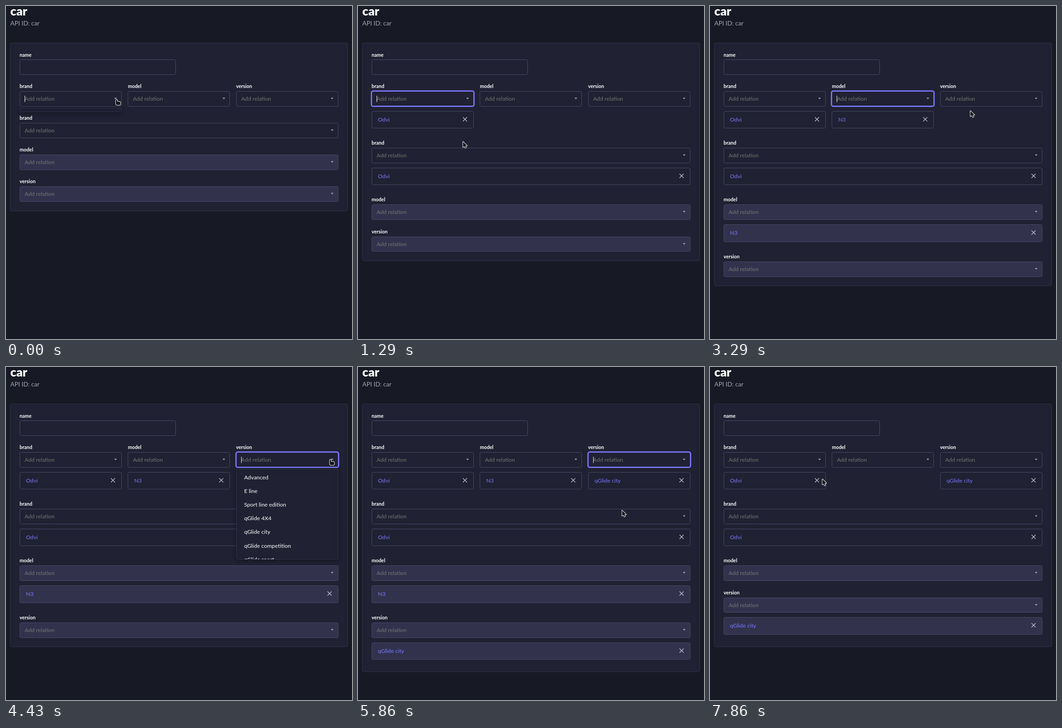
Animation of 762x735 px, one loop 8 s. Source, as an HTML page with a canvas:

```html
<!DOCTYPE html>
<html lang="en">
<head>
<meta charset="utf-8">
<title>Dependent relation fields</title>
<style>
html, body { margin: 0; width: 762px; height: 735px; overflow: hidden; background: #171924; }
canvas { display: block; }
</style>
</head>
<body>
<canvas id="stage" width="762" height="735"></canvas>
<script>
const ctx = document.getElementById('stage').getContext('2d');
const LOOP = 8000, TICK = 1000 / 7;
const BG = '#171924', CARD = '#202132', LINE = '#32324d', EDGE = '#4a4a6a', ACCENT = '#7b79ff';

const LEFT = 30, COLUMN_STEP = 238.4, COLUMN_W = 224.4, WIDE_W = 701.4;
const FIELD_Y = 188.2, FIELD_H = 32.8, FIELD_STEP = 70.2;
const CHIP_OFFSET = 43.8, CHIP_H = 37.4, CHIP_SPACE = 55.2;
const LIST_Y = 225, LIST_MAX = 199, OPTION_H = 30.1;

// each relation: the ticks at which its list opens and its choice is made
const RELATIONS = [
  { label: 'brand', open: 1, pick: 8, choice: 'Odvi', options: ['Odvi', 'KQM'] },
  { label: 'model', open: 15, pick: 23, choice: 'N3', options: ['N1', 'N3', 'W5', 'W6'] },
  { label: 'version', open: 31, pick: 39, choice: 'qGlide city',
    options: ['Advanced', 'E line', 'Sport line edition', 'qGlide 4X4', 'qGlide city',
      'qGlide competition', 'qGlide sport', 'qGlide sport'] }
];
RELATIONS.forEach((r, i) => { r.x = LEFT + i * COLUMN_STEP; });
const MODEL_REMOVED = 51;

// pointer stops: tick, x, y
const STOPS = [
  [0, 243, 206], [7, 133, 251], [11, 510, 436], [14, 487, 199], [21, 330, 275], [23, 573, 231],
  [30, 714, 204], [37, 595, 336], [39, 584, 318], [48, 517, 271], [50, 472, 248], [55, 247, 247]
];

// rests one tick at every stop, then eases to the next
function pointerAt(k) {
  const i = Math.max(1, STOPS.findIndex(s => s[0] >= k));
  const [t0, x0, y0] = STOPS[i - 1], [t1, x1, y1] = STOPS[i];
  const u = Math.max(0, (k - t0 - 1) / (t1 - t0 - 1)), e = u * u * (3 - 2 * u);
  return [x0 + (x1 - x0) * e, y0 + (y1 - y0) * e];
}

function text(str, x, y, color = '#fff', size = 12.3, weight = 400) {
  ctx.font = `${weight} ${size}px Lato, sans-serif`;
  ctx.fillStyle = color;
  ctx.fillText(str, x, y);
}

// one-pixel outline snapped to whole pixels
function box(x, y, w, h, fill, stroke) {
  const left = Math.round(x), top = Math.floor(y);
  ctx.beginPath();
  ctx.roundRect(left + 0.5, top + 0.5, Math.floor(x + w) - left, Math.floor(y + h) - top, 3);
  ctx.fillStyle = fill;
  ctx.fill();
  ctx.strokeStyle = stroke;
  ctx.lineWidth = 1;
  ctx.stroke();
}

function field(label, x, y, w, fill) {
  const top = Math.floor(y), arrowX = x + w - 13;
  text(label, x, top - 7, '#fff', 10.8, 700);
  box(x, y, w, FIELD_H, fill, EDGE);
  text('Add relation', x + 11, top + 20.5, '#757575');
  ctx.beginPath();
  ctx.moveTo(arrowX - 3, top + 14.5);
  ctx.lineTo(arrowX + 3, top + 14.5);
  ctx.lineTo(arrowX, top + 17.7);
  ctx.fillStyle = '#a5a5ba';
  ctx.fill();
}

function chip(label, x, y, w, fill) {
  const top = Math.floor(y), cx = x + w - 18.8, cy = top + 18;
  box(x, y, w, CHIP_H, fill, EDGE);
  text(label, x + 14, top + 23, ACCENT);
  ctx.beginPath();
  for (const s of [-1, 1]) {
    ctx.moveTo(cx - 4.5, cy - 4.5 * s);
    ctx.lineTo(cx + 4.5, cy + 4.5 * s);
  }
  ctx.strokeStyle = '#c0c0cf';
  ctx.lineWidth = 1.4;
  ctx.stroke();
}

function focusRing(x) {
  ctx.beginPath();
  ctx.roundRect(Math.round(x) - 0.4, 187.6, COLUMN_W + 1.4, 33.8, 4);
  ctx.strokeStyle = ACCENT;
  ctx.lineWidth = 2.7;
  ctx.stroke();
}

function list(x, items, scroll, [mx, my]) {
  const full = items.length * OPTION_H + 8, h = Math.min(LIST_MAX, full);
  ctx.save();
  ctx.shadowColor = 'rgba(3, 3, 5, .35)';
  ctx.shadowBlur = 10;
  ctx.shadowOffsetY = 2;
  box(x, LIST_Y, COLUMN_W, h, CARD, LINE);
  ctx.restore();

  ctx.save();
  ctx.beginPath();
  ctx.rect(x + 1, LIST_Y + 1, COLUMN_W - 1, h - 1);
  ctx.clip();
  items.forEach((item, i) => {
    const top = LIST_Y + 4 + i * OPTION_H - scroll * (full - h);
    if (mx > x && mx < x + COLUMN_W && my >= top && my < top + OPTION_H) {
      ctx.fillStyle = BG;
      ctx.fillRect(Math.round(x) + 4, Math.round(top), 217, 30);
    }
    text(item, x + 17.6, Math.round(top + 19));
  });
  ctx.restore();
}

function overIcon([mx, my]) {
  const near = (x, y) => Math.abs(mx - x) < 6 && Math.abs(my - y) < 8;
  return RELATIONS.some(({ x }) =>
    near(x + COLUMN_W - 13, 204) || near(x + COLUMN_W - 18.8, 250));
}

function pointer([x, y], hand) {
  ctx.beginPath();
  if (hand) {
    ctx.roundRect(x - 1, y + 0.5, 3, 9, 1.5);
    ctx.roundRect(x - 1, y + 5, 10, 7.5, 3);
  } else {
    ctx.moveTo(x + 0.5, y + 0.5);
    for (const [dx, dy] of [[0, 12], [3, 10], [5, 14], [7, 13], [5, 9], [9, 9]]) {
      ctx.lineTo(x + dx + 0.5, y + dy + 0.5);
    }
    ctx.closePath();
  }
  ctx.strokeStyle = '#f2f2f2';
  ctx.lineWidth = 2;
  ctx.lineJoin = 'round';
  ctx.stroke();
  ctx.fillStyle = '#17171d';
  ctx.fill();
}

function draw() {
  const k = Math.floor((performance.now() % LOOP + 6) / TICK) % 56;
  const mouse = pointerAt(k), removed = k >= MODEL_REMOVED;
  const picked = RELATIONS.map(r => k >= r.pick && !(removed && r.label === 'model'));
  const rowSpace = k >= RELATIONS[0].pick ? CHIP_SPACE : 0;
  const chipsSpace = picked.filter(Boolean).length * CHIP_SPACE;

  ctx.fillStyle = BG;
  ctx.fillRect(0, 0, 762, 735);
  text('car', 9.5, 21, '#fff', 27, 900);
  text('API ID: car', 9.5, 42.5, '#a5a5ba', 13.7);
  box(9, 81, 743, 371 + rowSpace + chipsSpace, CARD, LINE);
  text('name', LEFT, 112, '#fff', 10.8, 700);
  box(LEFT, 118.8, 343.8, FIELD_H, CARD, EDGE);

  let y = FIELD_Y + FIELD_STEP + rowSpace;
  RELATIONS.forEach(({ label, choice, x }, i) => {
    const fill = i ? LINE : CARD;
    field(label, x, FIELD_Y, COLUMN_W, CARD);
    field(label, LEFT, y, WIDE_W, fill);
    if (picked[i]) {
      chip(choice, x, FIELD_Y + CHIP_OFFSET, COLUMN_W, CARD);
      chip(choice, LEFT, y + CHIP_OFFSET, WIDE_W, fill);
      y += CHIP_SPACE;
    }
    y += FIELD_STEP;
  });

  if (!removed) {
    const active = RELATIONS.findLast(r => k >= r.open) || RELATIONS[0];
    const age = k - active.open, loaded = age >= 0;
    if (loaded) focusRing(active.x);
    if (Math.floor(age * TICK / 500) % 2 !== 1) {
      ctx.fillStyle = '#fff';
      ctx.fillRect(Math.round(active.x) + 11, 198, 1, 14);
    }
    if (k < active.pick) {
      const scroll = Math.min(1, Math.max(0, (age - 2) / 3));
      list(active.x, loaded ? active.options : [], scroll, mouse);
    }
  }
  pointer(mouse, overIcon(mouse));
  requestAnimationFrame(draw);
}
draw();
</script>
</body>
</html>
```
